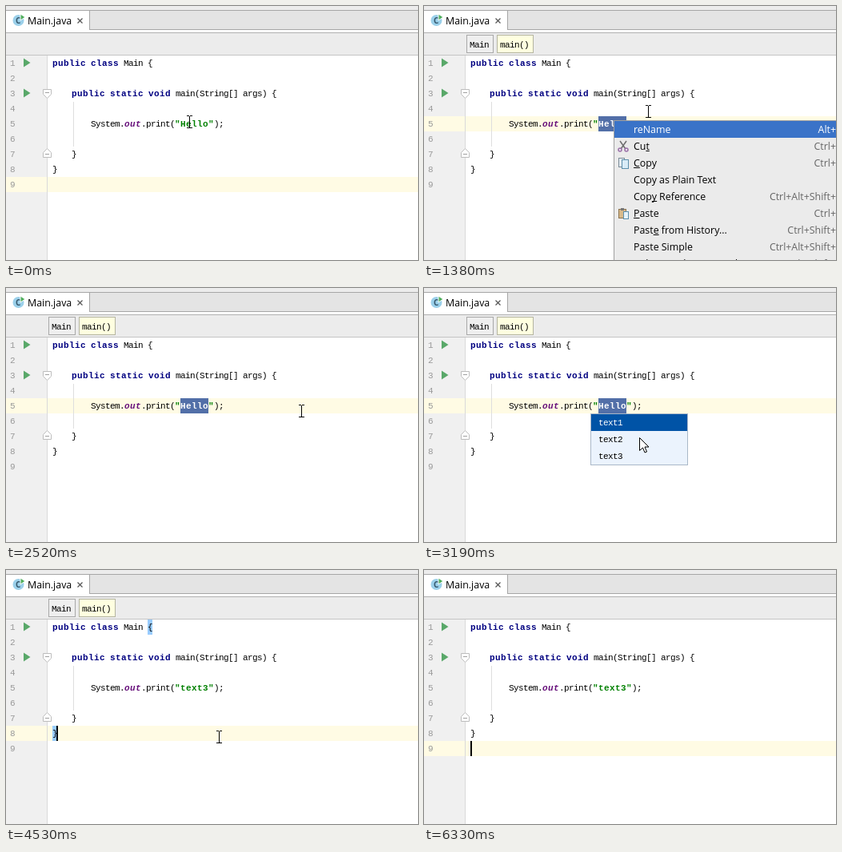
An HTML page with a canvas that plays this animation: 515 px wide and 318 px high, repeating every 6430 ms.

```html
<!DOCTYPE html>
<html lang="en">
<head>
<meta charset="utf-8">
<title>Editor</title>
<style>
html, body { margin: 0; width: 100%; height: 100%; overflow: hidden; background: #fff; }
canvas { display: block; width: 515px; height: 318px; }
</style>
</head>
<body>
<canvas id="stage" width="515" height="318"></canvas>
<script>
const ctx = document.getElementById('stage').getContext('2d');
const LOOP = 6430, W = 515, H = 318, ROW = 19, LEFT = 58;
const MONO = '"Liberation Mono", monospace';
const SANS = '"Open Sans", "Noto Sans", sans-serif';
const NAVY = '#000080', GREEN = '#008000', PURPLE = '#660e7a';

// Pointer steps: start time, shape, x, y
const POINTER = [
  [0, 'beam', 229, 145], [140, 'beam', 236, 147], [270, 'beam', 239, 147],
  [660, 'arrow', 237, 142],
  [1370, 'beam', 280, 132], [1520, 'beam', 318, 126], [1680, 'beam', 348, 139],
  [1810, 'arrow', 360, 146], [1950, 'arrow', 366, 150], [2230, 'arrow', 369, 153],
  [2520, 'beam', 369, 154], [2660, 'beam', 352, 160], [2790, 'beam', 334, 167],
  [2930, 'arrow', 302, 177], [3060, 'arrow', 280, 184], [3190, 'arrow', 269, 187],
  [3470, 'arrow', 263, 196], [3610, 'arrow', 260, 204], [3740, 'beam', 262, 214],
  [3880, 'beam', 266, 222], [4010, 'beam', 266, 209],
  [4790, 'beam', 260, 220], [4930, 'beam', 240, 226], [5080, 'beam', 170, 254],
  [5220, 'beam', 100, 278], [5370, 'arrow', 42, 268], [5510, 'none', 0, 0]
];

// Menu items: text, shortcut, index of the underlined letter, icon
const MENU = [
  ['reName', 'Alt+'],
  ['Cut', 'Ctrl+', 2, scissors],
  ['Copy', 'Ctrl+', 0, sheets],
  ['Copy as Plain Text', ''],
  ['Copy Reference', 'Ctrl+Alt+Shift+', 3],
  ['Paste', 'Ctrl+', 0, clipboard],
  ['Paste from History...', 'Ctrl+Shift+', 4],
  ['Paste Simple', 'Ctrl+Alt+Shift+'],
  ['Column Selection Mode', 'Alt+Shift+']
];

const rowTop = n => 62 + ROW * (n - 1);
const within = (t, a, b) => t >= a && t < b;

function rect(x, y, w, h, fill) {
  ctx.fillStyle = fill;
  ctx.fillRect(x, y, w, h);
}

function box(x, y, w, h, fill, edge) {
  rect(x, y, w, h, edge);
  rect(x + 1, y + 1, w - 2, h - 2, fill);
}

function poly(points, fill, stroke) {
  ctx.beginPath();
  points.forEach(([x, y]) => ctx.lineTo(x, y));
  ctx.closePath();
  ctx.fillStyle = fill;
  ctx.fill();
  if (stroke) {
    ctx.strokeStyle = stroke;
    ctx.lineWidth = 1;
    ctx.stroke();
  }
}

function line(x1, y1, x2, y2, color, width) {
  ctx.beginPath();
  ctx.moveTo(x1, y1);
  ctx.lineTo(x2, y2);
  ctx.strokeStyle = color;
  ctx.lineWidth = width;
  ctx.stroke();
}

function label(text, x, y, color, align = 'left', font = '12.4px') {
  ctx.font = `${font} ${SANS}`;
  ctx.letterSpacing = '0px';
  ctx.textAlign = align;
  ctx.fillStyle = color;
  ctx.fillText(text, x, y);
  ctx.textAlign = 'left';
}

// Regular cells are 6px wide, bold ones 7px; returns the end of the text
function code(text, x, y, color = '#000', style = '') {
  const bold = style.includes('bold');
  ctx.font = `${style} 11px ${MONO}`;
  ctx.letterSpacing = bold ? '0.4px' : '-0.6px';
  ctx.fillStyle = color;
  ctx.fillText(text, x, y);
  return x + text.length * (bold ? 7 : 6);
}

function codeLine(n, indent, parts) {
  let x = LEFT + indent * 6;
  for (const [text, color, style] of parts) x = code(text, x, rowTop(n) + 13, color, style);
}

function scissors(x, y) {
  line(x - 4, y - 7, x + 3, y + 3, '#6e6e6e', 1.5);
  line(x + 4, y - 7, x - 3, y + 3, '#6e6e6e', 1.5);
  for (const dx of [-4, 4]) {
    ctx.beginPath();
    ctx.arc(x + dx, y + 4, 2, 0, 7);
    ctx.strokeStyle = '#9a6fa8';
    ctx.stroke();
  }
}

function sheets(x, y) {
  box(x - 6, y - 7, 8, 12, '#e8eef3', '#7b8b98');
  box(x - 2, y - 5, 9, 12, '#d9ecf7', '#5d8fac');
}

function clipboard(x, y) {
  box(x - 6, y - 6, 10, 12, '#d8b98a', '#8c7450');
  rect(x - 3, y - 7, 4, 3, '#777');
  box(x, y - 3, 7, 10, '#e6f2f9', '#5d8fac');
}

function drawFrame() {
  rect(0, 0, W, H, '#fff');
  rect(0, 0, W, 5, '#ececec');
  rect(0, 5, W, 1, '#a6a6a6');
  rect(0, 6, W, 24, '#e4e4e4');
  rect(0, 29, W, 1, '#a6a6a6');
  rect(0, 6, 104, 24, '#fff');
  rect(104, 6, 1, 24, '#a6a6a6');
  rect(0, 33, W, 1, '#b0b0b0');
  rect(0, 34, W, 27, '#ececec');
  rect(0, 61, W, 1, '#c4c4c4');

  ctx.beginPath();
  ctx.arc(15.5, 18, 7, 0, 7);
  ctx.fillStyle = '#9bd0ea';
  ctx.fill();
  label('C', 12, 22, '#35566b', 'left', 'bold 10px');
  poly([[18, 10], [24, 14], [18, 18]], '#4fae5c', '#fff');
  label('Main.java', 27, 22.5, '#000');
  line(89.5, 15.5, 95.5, 21.5, '#555', 1.3);
  line(95.5, 15.5, 89.5, 21.5, '#555', 1.3);
}

function drawGutter(row) {
  rect(0, 62, 51, H - 62, '#f0f0f0');
  rect(0, rowTop(row), W, ROW, '#fffbe4');
  rect(51, 62, 1, H - 62, '#d9d9d9');
  for (let n = 1; n <= 9; n++) code(String(n), 5, rowTop(n) + 13, '#999');
  for (const n of [1, 3]) {
    const y = rowTop(n) + 9;
    poly([[22, y - 5.5], [30.5, y], [22, y + 5.5]], '#59a869');
  }
  for (const [n, d] of [[3, 1], [7, -1]]) {
    const y = rowTop(n) + 9 + d / 2;
    poly([[46.5, y - 5 * d], [56.5, y - 5 * d], [56.5, y + d], [51.5, y + 6 * d], [46.5, y + d]],
      '#fff', '#bdbdbd');
    rect(49, y - 0.5 - d, 5, 1, '#a0a0a0');
  }
}

function drawCrumbs(t) {
  if (!within(t, 270, 5220)) return;
  const inMethod = t < 4930;
  box(53, 36, 34, 23, inMethod ? '#efefef' : '#ffffe0', '#a8a8a8');
  code('Main', 57, 52);
  if (inMethod) {
    box(91, 36, 46, 23, '#ffffe0', '#b4b4a0');
    code('main()', 95, 52);
  }
}

function drawCode(t, row) {
  const selected = within(t, 400, 3740);
  const word = t < 3740 ? 'Hello' : 'text3';
  rect(84, 120, 1, 56, '#dedede');

  if (row === 8) {
    rect(177, rowTop(1), 6, ROW, '#99ccff');
    rect(LEFT, rowTop(8), 6, ROW, '#99ccff');
  }
  if (selected) rect(218, rowTop(5), 35, ROW, '#526fa8');

  const key = text => [text, NAVY, 'bold'];
  const str = (text, color = GREEN) => [text, color, 'bold'];
  codeLine(1, 0, [key('public'), [' '], key('class'), [' Main {']]);
  codeLine(3, 4, [key('public'), [' '], key('static'), [' '], key('void'),
    [' main(String[] args) {']]);
  codeLine(5, 8, [['System.'], ['out', PURPLE, 'italic bold'], ['.print('],
    str('"'), str(word, selected ? '#fff' : GREEN), str('"'), [');']]);
  codeLine(7, 4, [['}']]);
  codeLine(8, 0, [['}']]);

  if (within(t, 940, 1370)) rect(238, rowTop(5), 2, ROW, '#000');
  if (row === 8) rect(63, rowTop(8), 2, ROW, '#000');
  if (within(t, 4930, 5940) || t >= 6330) rect(LEFT, rowTop(9), 2, ROW, '#000');
}

function drawMenu(t) {
  if (!within(t, 1220, 2520)) return;
  box(237, 143, 300, 200, '#ebebeb', '#a0a0a0');
  MENU.forEach(([text, keys, mark, icon], i) => {
    const y = 155 + i * 21, active = i === 0 && t >= 1370;
    if (active) rect(238, 144, W - 238, 21, '#3a73c8');
    label(text, 262, y + 3.5, active ? '#fff' : '#000');
    if (mark !== undefined) {
      const from = ctx.measureText(text.slice(0, mark)).width;
      rect(262 + from, y + 5, ctx.measureText(text[mark]).width, 1, '#000');
    }
    label(keys, W, y + 3.5, active ? '#fff' : '#666', 'right');
    if (icon) icon(249, y);
  });
}

function drawPopup(t) {
  if (!within(t, 2790, 3740)) return;
  const active = t < 3470 ? 0 : t < 3610 ? 1 : 2;
  box(208, 157, 122, 65, '#ebf3fd', '#aab8c8');
  for (let i = 0; i < 3; i++) {
    const on = i === active;
    if (on) rect(209, 158 + i * 21, 120, 21, '#0053a6');
    code('text' + (i + 1), 218, 172 + i * 21, on ? '#fff' : '#000');
  }
}

function drawPointer(t) {
  const [, kind, x, y] = POINTER.filter(p => p[0] <= t).pop();
  if (kind === 'beam') {
    rect(x, y - 7, 1, 15, '#000');
    for (const dy of [-8, 7]) {
      rect(x - 3, y + dy, 3, 1, '#000');
      rect(x + 1, y + dy, 3, 1, '#000');
    }
  } else if (kind === 'arrow') {
    const shape = [[0, 0], [0, 16], [4, 12.5], [6.5, 18.5], [9, 17.5], [6.5, 11.5], [11.5, 11.5]];
    poly(shape.map(([dx, dy]) => [x + dx + 0.5, y + dy + 0.5]), '#fff', '#000');
  }
}

function render(t) {
  const row = t < 270 || t >= 4930 ? 9 : t < 4530 ? 5 : 8;
  drawFrame();
  drawGutter(row);
  drawCrumbs(t);
  drawCode(t, row);
  drawMenu(t);
  drawPopup(t);
  drawPointer(t);
}

let start;
function tick(now) {
  start ??= now;
  render((now - start) % LOOP);
  requestAnimationFrame(tick);
}
render(0);
requestAnimationFrame(tick);
</script>
</body>
</html>
```
